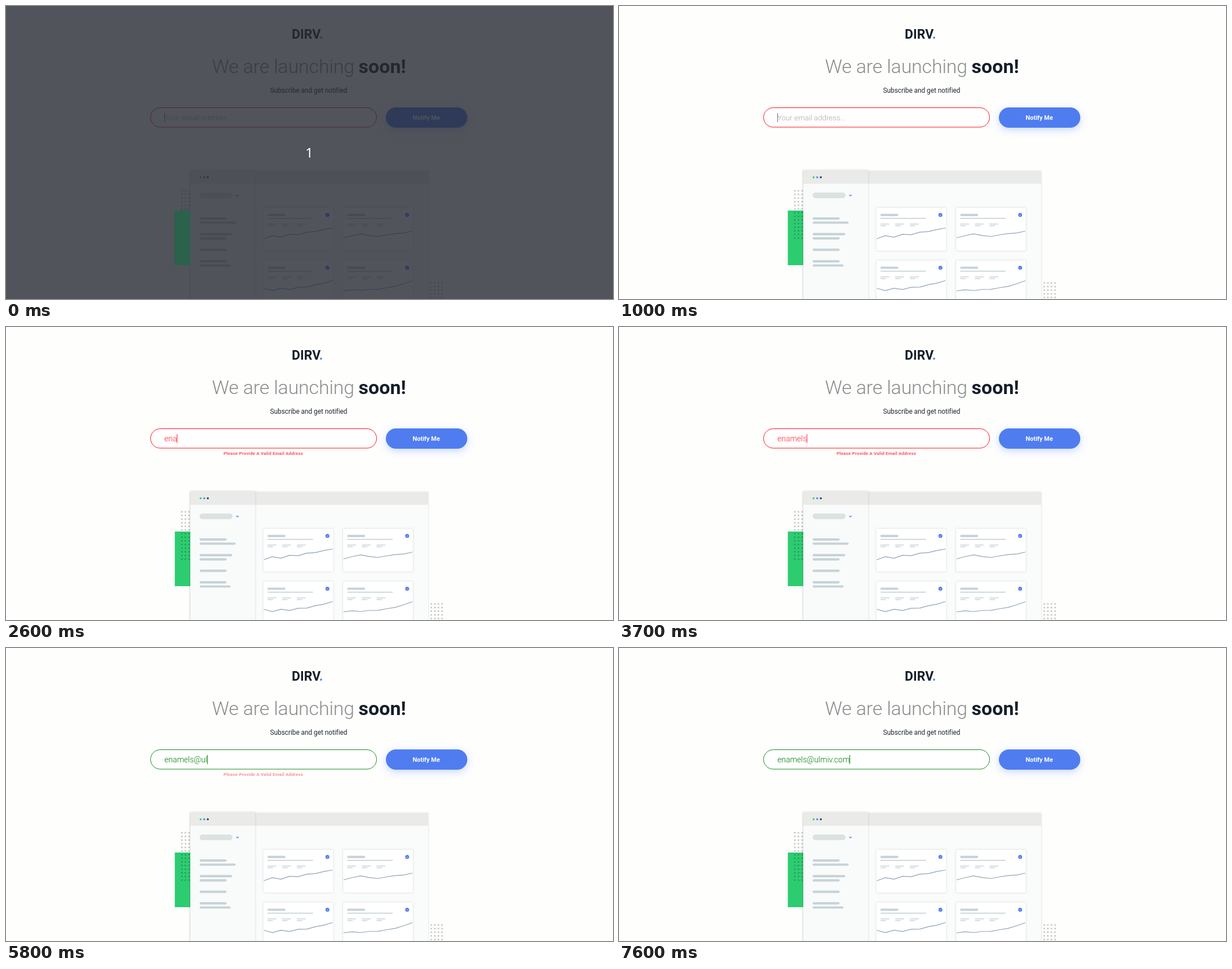
Write an HTML page that moves like this. It is 1077x520 px and loops after 8 s.

```html
<!DOCTYPE html>
<html lang="en">
<head>
<meta charset="utf-8">
<title>We are launching soon</title>
<style>
html, body { margin: 0; width: 100%; height: 100%; overflow: hidden; background: #fefefd; }
svg { display: block; width: 100%; height: 100%; }
text { font-family: Roboto, "Open Sans", sans-serif; white-space: pre; }
.brand { font-size: 23px; font-weight: 700; }
.head { font-size: 34px; font-weight: 300; letter-spacing: -.2px; }
.soon { font-size: 34px; font-weight: 700; }
.sub { font-size: 12px; letter-spacing: -.1px; }
.field { font-size: 14px; font-weight: 300; }
.hint { font-size: 13.3px; }
.button { font-size: 11px; font-weight: 700; }
.error { font-size: 8px; font-weight: 700; letter-spacing: .17px; }
.count { font-family: "Noto Sans", sans-serif; font-size: 24px; }
</style>
</head>
<body>
<svg viewBox="0 0 1077 520">
  <defs>
    <filter id="glow" x="-20%" y="-80%" width="140%" height="280%">
      <feDropShadow dx="0" dy="4" stdDeviation="7" flood-color="#4f7ef3" flood-opacity=".3"/>
    </filter>
    <filter id="soft" x="-10%" y="-10%" width="120%" height="120%">
      <feDropShadow dx="0" dy="0" stdDeviation="1.6" flood-color="#56686c" flood-opacity=".3"/>
    </filter>
  </defs>
  <rect width="1077" height="520" fill="#fefefd"/>

  <text class="brand" x="507" y="57.5" fill="#151f29">DIRV<tspan fill="#4f7ef3">.</tspan></text>
  <text class="head" x="365.5" y="119" fill="#8a8d8c">We are launching</text>
  <text class="soon" x="625.5" y="119" fill="#151f29">soon!</text>
  <text class="sub" x="537" y="153.5" fill="#222b33" text-anchor="middle">Subscribe and get notified</text>

  <rect id="box" x="256.5" y="180.5" width="401" height="34.5" rx="17.25" fill="#fff"/>
  <text id="hint" class="field hint" x="281" y="202.5" fill="#a8a8a8">Your email address...</text>
  <text id="entry" class="field" x="281" y="202.5"></text>
  <rect id="caret" y="190" width="1" height="16"/>
  <text id="error" class="error" x="456.5" y="226.6" fill="#ff5263" text-anchor="middle">Please Provide A Valid Email Address</text>

  <rect x="674" y="180" width="144.5" height="36" rx="18" fill="#4f7df0" filter="url(#glow)"/>
  <text class="button" x="745.7" y="202.3" fill="#fff" text-anchor="middle">Notify Me</text>

  <g id="art"></g>

  <g id="cover">
    <rect width="1077" height="520" fill="#262a32" fill-opacity=".8"/>
    <rect x="299.5" y="363" width="27.5" height="97" fill="#2a624b"/>
    <text class="count" x="538" y="269" fill="#fff" text-anchor="middle">1</text>
  </g>
</svg>
<script>
const $ = id => document.getElementById(id);
const LOOP = 8000, LEFT = 281, BLINK = 600;
const BLUE = '#4f7df0', GREEN = '#2ecc71', HEADER = '#eaeae9';

// ---- illustration ----
const rect = (x, y, w, h, fill, more = '') =>
  `<rect x="${x}" y="${y}" width="${w}" height="${h}" fill="${fill}" ${more}/>`;
const panel = (x, y, w, h, fill) => rect(x, y, w, h, fill, 'rx="1" filter="url(#soft)"');
const bar = (x, y, w, h = 4.2, fill = '#c7d3d8') => rect(x, y, w, h, fill, `rx="${h / 2}"`);
const dot = (x, y, r, fill) => `<circle cx="${x}" cy="${y}" r="${r}" fill="${fill}"/>`;
const stroke = (d, color, width) =>
  `<path d="${d}" fill="none" stroke="${color}" stroke-width="${width}"/>`;

function crosses(x, y, cols, rows) {
  let d = '';
  for (let i = 0; i < cols; i++)
    for (let j = 0; j < rows; j++)
      d += `M${x + i * 6.4 - 1.3} ${y + j * 6.46 - 1.3}l2.6 2.6m0 -2.6l-2.6 2.6`;
  return stroke(d, 'rgba(0,0,0,.34)', 0.9);
}

// A rising curve with a wobble that dies out to the right.
function chart(x, y, { rise, bend, wobble, turn }) {
  const points = Array.from({ length: 9 }, (_, i) => {
    const u = i / 8;
    return `${x + u * 122} ${y - rise * u ** bend + wobble * Math.cos(turn * i) * (1 - u)}`;
  });
  return stroke('M' + points.join('L'), '#8da0b4', 1.2);
}

function card(x, y, base, curve) {
  let s = panel(x, y, 123.5, 76, '#fff');
  s += bar(x + 7, y + 10.7, 32) + bar(x + 7, y + 18, 81, 1.8);
  for (let i = 0; i < 3; i++)
    s += bar(x + 7 + 26 * i, y + 28.3, 16, 1.5) + bar(x + 7 + 26 * i, y + 31.3, 10, 1.5);
  s += dot(x + 113.5, y + 12.8, 3.5, BLUE);
  s += stroke(`M${x + 112} ${y + 13}l1 1l2 -2.3`, '#fff', 0.7);
  return s + chart(x + 0.6, y + base, curve);
}

function sidebar() {
  let y = 375, s = '';
  for (const group of [[48, 64], [58, 48], [48], [48, 55]]) {
    for (const w of group) {
      s += bar(343.5, y, w);
      y += 7.4;
    }
    y += 13;
  }
  return s;
}

function drawArt() {
  const zig = Math.PI;
  let s = rect(299.5, 363, 30, 97, GREEN);
  s += crosses(312, 328, 3, 14) + crosses(754.5, 491.5, 4, 5);
  s += panel(327, 293, 422, 240, '#fafbfb') + rect(327, 293, 422, 22.5, HEADER);
  s += panel(327, 291.5, 115, 240, '#f9fbfb') + rect(327, 291.5, 115, 24, HEADER);
  [GREEN, BLUE, '#22303d'].forEach((c, i) => s += dot(345.3 + 6.4 * i, 304, 1.7, c));
  s += bar(343.5, 331, 58.5, 10, '#dce2e2') + stroke('M408.6 335l2.1 2.1l2.1 -2.1', BLUE, 1.1);
  s += sidebar();
  s += card(456.8, 358, 52.5, { rise: 16.5, bend: 1.5, wobble: 2.5, turn: zig });
  s += card(598.3, 358, 49.5, { rise: 8, bend: 4, wobble: 4, turn: zig / 2 });
  s += card(456.8, 451.7, 51.5, { rise: 16, bend: 2.4, wobble: -2.2, turn: zig });
  s += card(598.3, 451.7, 52.8, { rise: 17, bend: 3, wobble: 1, turn: zig });
  $('art').innerHTML = s;
}

// ---- typing ----
const EMAIL = 'enamels@ulmiv.com';
// Bursts of key presses: first press, gap, count.
const BURSTS = [[2000, 233, 4], [2900, 300, 2], [3700, 1500, 2], [5600, 166, 4], [6400, 166, 4], [7600, 0, 1]];
const KEYS = BURSTS.flatMap(([first, gap, n]) => Array.from({ length: n }, (_, i) => first + gap * i));

// An address is valid once its domain has begun and does not end in a dot.
const isValid = s => /@.*[a-z]$/.test(s);

function ease(t, start, length) {
  const p = Math.min(1, Math.max(0, (t - start) / length));
  return p * p * (3 - 2 * p);
}

const errorOpacity = t => ease(t, 2000, 500) - ease(t, 5600, 500)
  + 0.5 * (ease(t, 6530, 270) - ease(t, 6800, 200));

function draw(ms) {
  const t = Math.floor(ms / 100) * 100;
  const pressed = KEYS.filter(k => k <= t);
  const typed = EMAIL.slice(0, pressed.length);
  const valid = isValid(typed);
  const ink = valid ? '#007a08' : '#ff2a3a';

  $('cover').style.display = t < 100 ? '' : 'none';
  $('box').setAttribute('stroke', valid ? '#148a1c' : '#ff1018');
  $('hint').style.display = typed ? 'none' : '';

  const entry = $('entry');
  entry.textContent = typed;
  entry.setAttribute('fill', ink);

  const caret = $('caret');
  const end = typed ? entry.getComputedTextLength() : 0;
  const idle = t - (pressed.length ? pressed[pressed.length - 1] : -200);
  caret.setAttribute('x', Math.round(LEFT + end));
  caret.setAttribute('fill', typed ? ink : '#6b6b6b');
  caret.style.display = Math.floor(idle / BLINK) % 2 ? 'none' : '';

  $('error').setAttribute('opacity', errorOpacity(t));
}

drawArt();
const start = performance.now();
function tick() {
  draw((performance.now() - start) % LOOP);
  requestAnimationFrame(tick);
}
tick();
</script>
</body>
</html>
```
